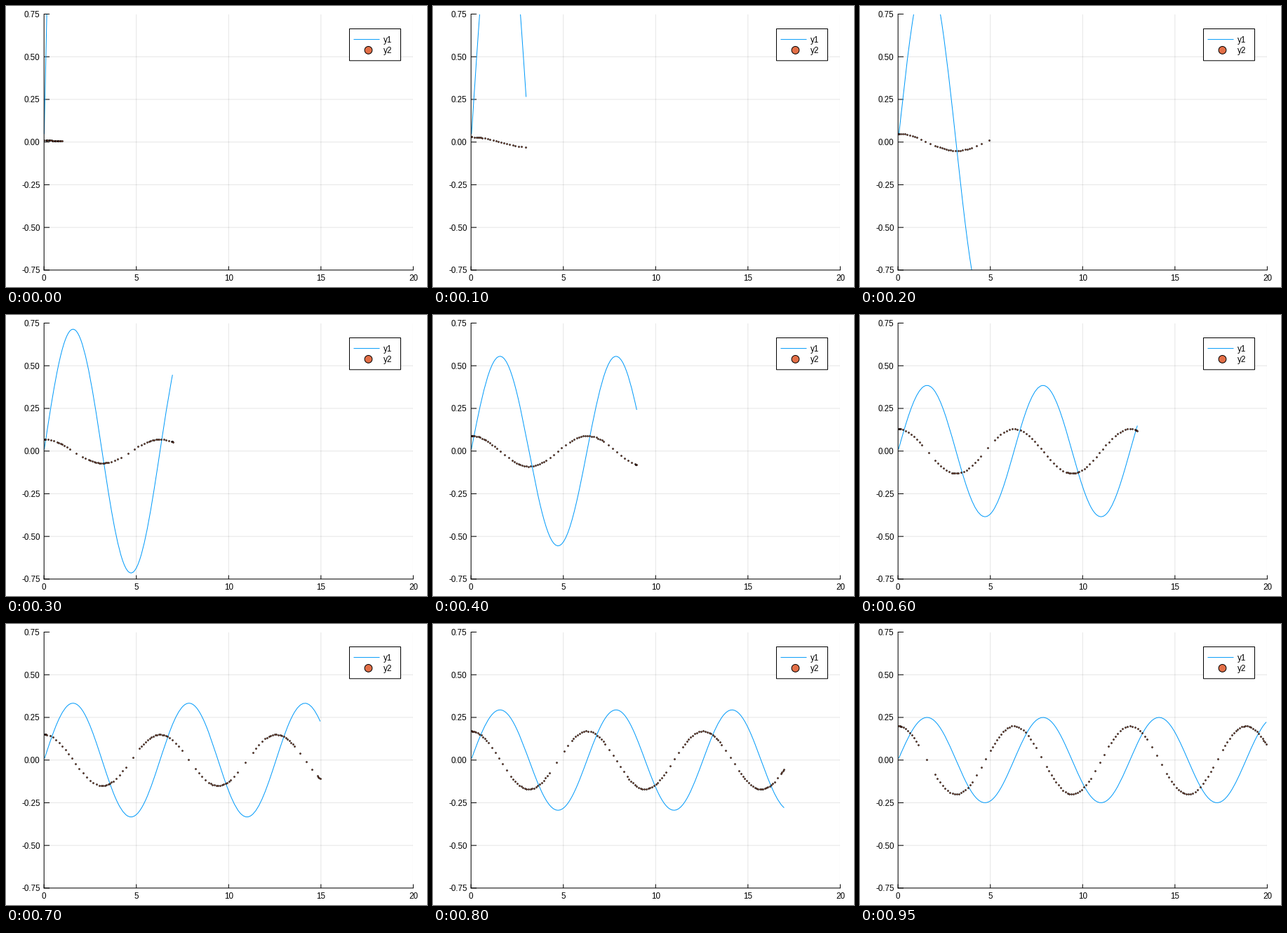
These frames come from a looping animation (600 by 400 pixels, 1 s). A matplotlib script:

```python
import matplotlib.pyplot as plt
import numpy as np
from matplotlib.animation import FuncAnimation
from matplotlib.patches import Circle, Rectangle

W, H, DPI = 600, 400, 100
FRAMES, INTERVAL = 20, 50
LEFT, RIGHT, TOP, BOTTOM = 54.2, 580.4, 11.5, 375.9
BLUE, ORANGE = "#009afa", "#e36f47"
PX = 72 / DPI  # one pixel in points

plt.rcParams.update({
    "font.family": "Liberation Sans",
    "font.size": 11.6 * PX,
    "path.snap": False,
})


def dsfmt(seed, count):
    """First `count` uniform numbers of the dSFMT-19937 generator."""
    m32, m64 = 2**32 - 1, 2**64 - 1
    size, lag = 768, 11
    mid = (size - lag) // 2
    s = [0x8B8B8B8B] * size

    for i in range(size):
        a, b = (i + mid) % size, (i + mid + lag) % size
        r = s[i] ^ s[a] ^ s[i - 1]
        r = (r ^ r >> 27) * 1664525 & m32
        s[a] = (s[a] + r) & m32
        r = (r + (1 if i == 0 else i + seed * (i == 1))) & m32
        s[b] = (s[b] + r) & m32
        s[i] = r
    for i in range(size):
        a, b = (i + mid) % size, (i + mid + lag) % size
        r = (s[i] + s[a] + s[i - 1]) & m32
        r = (r ^ r >> 27) * 1566083941 & m32
        s[a] ^= r
        r = (r - i) & m32
        s[b] ^= r
        s[i] = r

    words = [s[k] | s[k + 1] << 32 for k in range(0, size, 2)]
    lung, state = words[-2:], words[:-2]
    low = 2**52 - 1
    state = [w & low | 0x3FF << 52 for w in state]
    masks = 0x000FFAFFFFFFFB3F, 0x000FFDFFFC90FFFD
    out = []
    for k in range(0, count, 2):
        swapped = [(v >> 32 | v << 32) & m64 for v in reversed(lung)]
        for j in range(2):
            t = state[k + j]
            lung[j] = (t << 19 & m64) ^ swapped[j] ^ state[k + 234 + j]
            r = lung[j] >> 12 ^ lung[j] & masks[j] ^ t
            out.append((r & low) / 2**52)
    return out[:count]


JITTER = dsfmt(1337, 19)


def adaptive_grid(f, end, limit=0.05):
    """Sample [0, end], halving the intervals where f bends most."""
    x = np.linspace(0, end, 21)
    x[1] *= 0.25
    x[-2] = end - (end - x[-2]) * 0.25
    for i, u in enumerate(JITTER, 1):
        x[i] += 0.1 * (u - 0.5) * (x[i + 1] - x[i - 1])

    while True:
        y = f(x)
        span = np.ptp(y[1:-1])
        slope = np.diff(y) / np.diff(x)
        bend = np.zeros(len(x))
        bend[1:-1] = 2 * np.abs(np.diff(slope)) * (x[2:] - x[:-2]) / span
        centre = np.arange(3, len(x) - 3, 2)
        curve = (bend[centre - 1] + 2 * bend[centre] + bend[centre + 1]) / 4
        curve = np.pad(curve, 1, mode="edge")

        order = np.argsort(curve, kind="stable")
        order = order[curve[order] > limit][-(len(curve) // 2):]
        if not len(order):
            return x[1:-1]
        p = 2 * np.sort(order) + 1
        halves = np.concatenate([p, p + 1])
        x = np.insert(x, halves, (x[halves - 1] + x[halves]) / 2)


fig = plt.figure(figsize=(W / DPI, H / DPI), dpi=DPI, facecolor="white")
ax = fig.add_axes([LEFT / W, 1 - BOTTOM / H,
                   (RIGHT - LEFT) / W, (BOTTOM - TOP) / H])
ax.set(xlim=(0, 20), ylim=(-0.75, 0.75))
xticks, yticks = np.arange(0, 21, 5), np.linspace(-0.75, 0.75, 7)
ax.set_xticks(xticks, [str(v) for v in xticks])
ax.set_yticks(yticks, [f"{v:.2f}" for v in yticks])
ax.tick_params(length=0)
ax.tick_params(axis="x", pad=6 * PX)
ax.tick_params(axis="y", pad=5.6 * PX)
ax.grid(color="black", alpha=0.1, linewidth=PX)
ax.set_axisbelow(True)
ax.spines[["top", "right"]].set_visible(False)
ax.spines[["left", "bottom"]].set_linewidth(PX)
tick = dict(color="black", linewidth=PX, clip_on=False)
ax.vlines(xticks, 0, 0.015, transform=ax.get_xaxis_transform(), **tick)
ax.hlines(yticks, 0, 0.015, transform=ax.get_yaxis_transform(), **tick)

line, = ax.plot([], [], color=BLUE, linewidth=PX)
dots, = ax.plot([], [], "o", markersize=1.8 * PX, markerfacecolor=ORANGE,
                markeredgecolor="black", markeredgewidth=0.8 * PX)

# Legend, in pixels from the top left corner
key = fig.add_axes([0, 0, 1, 1])
key.set(xlim=(0, W), ylim=(H, 0))
key.axis("off")
key.add_patch(Rectangle((489.5, 32.5), 73, 45.3, facecolor="white",
                        edgecolor="black", linewidth=PX))
key.plot([496, 532], [47.6, 47.6], color=BLUE, linewidth=PX)
key.add_patch(Circle((516.5, 62.9), 5.4, facecolor=ORANGE,
                     edgecolor="black", linewidth=PX))
key.text(538, 52, "y1")
key.text(538, 67, "y2")


def update(frame):
    n = frame + 1
    for artist, f in ((line, lambda x: 5 / n * np.sin(x)),
                      (dots, lambda x: n / 100 * np.cos(x))):
        x = adaptive_grid(f, n)
        artist.set_data(x, f(x))
    return line, dots


anim = FuncAnimation(fig, update, frames=FRAMES, interval=INTERVAL,
                     repeat=True, repeat_delay=0)
plt.show()
```
